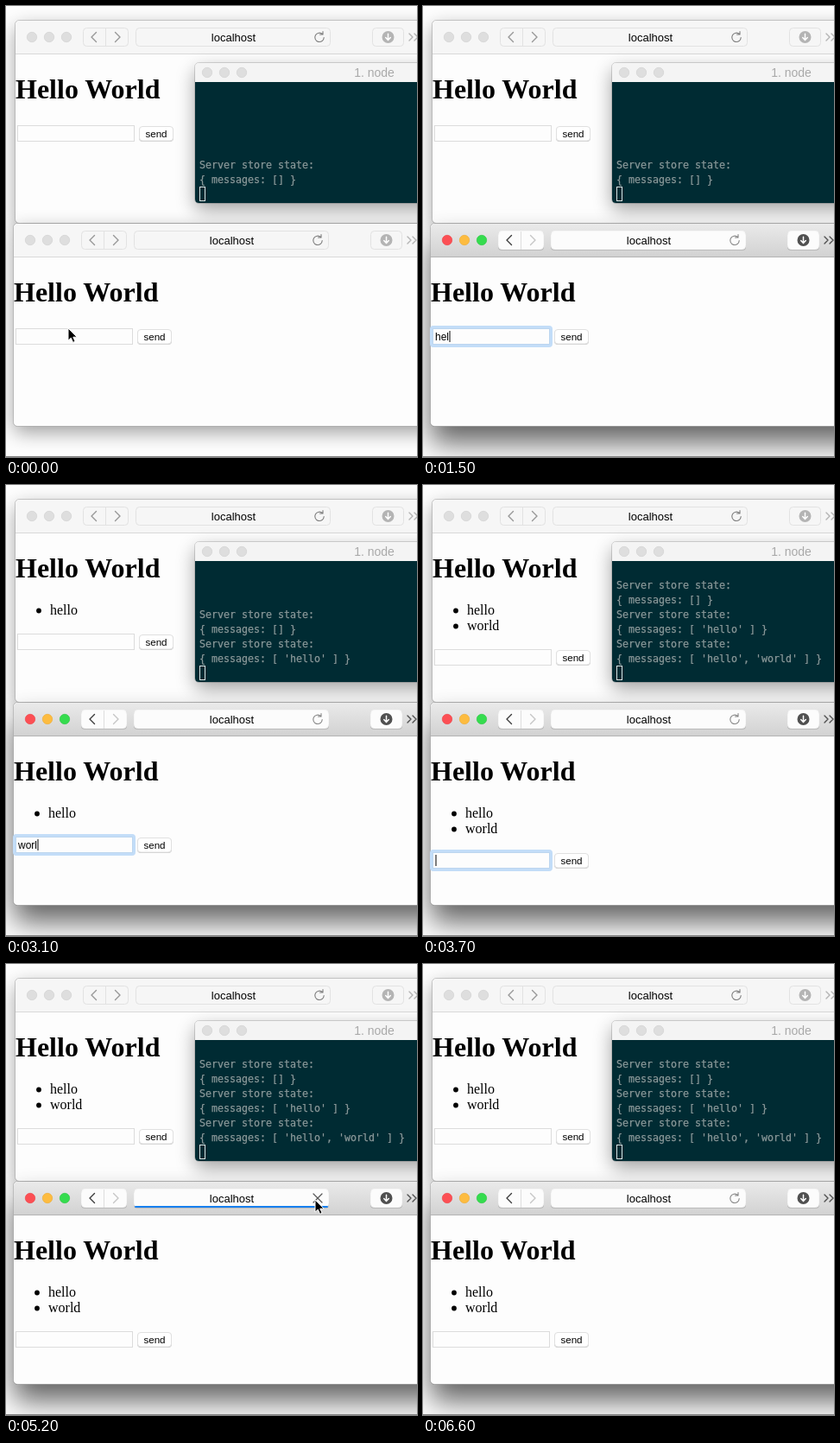
An HTML page for the animation above (6.7 s loop, 476 by 522 pixels).

```html
<!DOCTYPE html>
<html lang="en">
<head>
<meta charset="utf-8">
<title>Two browsers sharing a store</title>
<style>
  html, body { margin: 0; width: 100%; height: 100%; overflow: hidden; background: #fdfdfd; }
  svg { display: block; width: 476px; height: 522px; }
  text { font-family: "Liberation Sans", Arial, sans-serif; fill: #000; white-space: pre; }
  .serif { font-family: "Liberation Serif", Times, serif; font-size: 16px; }
  .h1 { font-size: 32px; font-weight: bold; }
  .mono { font-family: "DejaVu Sans Mono", monospace; font-size: 11.63px; fill: #8a9899; stroke: #8a9899; stroke-width: .25px; }
  .line { fill: none; stroke-linecap: round; stroke-linejoin: round; }
</style>
</head>
<body>
<svg viewBox="0 0 476 522" xmlns="http://www.w3.org/2000/svg">
  <defs>
    <linearGradient id="bar" x2="0" y2="1">
      <stop stop-color="#eaeaea"/><stop offset="1" stop-color="#d2d2d2"/>
    </linearGradient>
    <filter id="soft" x="-20%" y="-30%" width="140%" height="170%"><feGaussianBlur stdDeviation="11"/></filter>
    <filter id="deep" x="-20%" y="-40%" width="140%" height="190%"><feGaussianBlur stdDeviation="16"/></filter>
  </defs>
  <g id="scene"></g>
  <g id="arrow">
    <path d="M0 0V14.2L3.3 11.2L5.6 16.4L8.1 15.3L5.8 10.2H10.2Z" fill="#000" stroke="#fff" stroke-width="1"/>
  </g>
  <g id="beam" class="line">
    <path d="M-3.5 -8Q0 -8 0 -5.5Q0 -8 3.5 -8M0 -6V6M-3.5 8Q0 8 0 5.5Q0 8 3.5 8M-2 2.5H2" stroke="#111" stroke-width="1.3"/>
  </g>
</svg>
<script>
const LOOP = 6700;
const scene = document.getElementById('scene');
const arrow = document.getElementById('arrow');
const beam = document.getElementById('beam');

const words = [
  { text: 'hello', start: 1300, sent: 2200 },
  { text: 'world', start: 2800, sent: 3700 }
];
const KEY_TIME = 100;
const FOCUS_WINDOW = 300, FOCUS_INPUT = 700, HIDE_MOUSE = 1200, SHOW_MOUSE = 3900;
const LOAD_START = 5000, LOAD_DONE = 5500;

// Pointer keys: time, x, y
const path = [
  [0, 72, 373], [3900, 72, 373], [4400, 352, 280], [4800, 358, 273],
  [5600, 358, 273], [6200, 490, 330], [LOOP, 490, 330]
];

const rect = (x, y, w, h, r, attrs) =>
  `<rect x="${x}" y="${y}" width="${w}" height="${h}" rx="${r}" ${attrs}/>`;
const label = (x, y, str, attrs) => `<text x="${x}" y="${y}" ${attrs}>${str}</text>`;
const stroke = (d, color, width) =>
  `<path class="line" d="${d}" stroke="${color}" stroke-width="${width}"/>`;

function lights(x, y, focused) {
  const on = [['#fc4f54', '#ee474b'], ['#fdbc40', '#eeae38'], ['#35dc4e', '#2fcb46']];
  return on.map(([fill, edge], i) =>
    `<circle cx="${x + i * 20}" cy="${y}" r="5.7" fill="${focused ? fill : '#dedede'}" stroke="${focused ? edge : '#d2d2d2'}" stroke-width=".7"/>`
  ).join('');
}

function shadow(x, y, w, h, focused) {
  return focused
    ? rect(x, y + 20, w, h, 5, 'fill="#000" opacity=".6" filter="url(#deep)"')
    : rect(x, y + 8, w, h, 5, 'fill="#000" opacity=".36" filter="url(#soft)"');
}

function toolButton(x, w, focused) {
  return (focused ? rect(x, 26, w, 22, 4, 'fill="#bcbcbc"') : '') +
    rect(x + .5, 25.5, w - 1, 21, 4, focused
      ? 'fill="#fcfcfc" stroke="#f6f6f6"'
      : 'fill="#f6f6f6" stroke="#e2e2e2"');
}

function toolbar(focused, progress) {
  const back = focused ? '#3c3c3c' : '#979797';
  const forward = focused ? '#c6c6c6' : '#979797';
  const dark = focused ? '#505050' : '#b4b4b4';
  const reload = focused ? '#858585' : '#7c7c7c';
  const icon = progress > 0
    ? stroke('M358 31L368 41M368 31L358 41', '#555', 1.2)
    : stroke('M366.5 32.5A5.2 5.2 0 1 0 368.2 36.5M363.5 33H367V29.5', reload, 1.1);
  return `<path d="M11 55V22Q11 17 16 17H620V55Z" fill="${focused ? 'url(#bar)' : '#f6f6f6'}"/>` +
    rect(11, 55, 600, 1, 0, `fill="${focused ? '#b4b4b4' : '#d9d9d9'}"`) +
    lights(30, 36, focused) +
    toolButton(89, 53, focused) +
    rect(115, 26, 1, 21, 0, `fill="${focused ? '#dedede' : '#e2e2e2'}"`) +
    stroke('M104.5 30.5L99 36L104.5 41.5', back, 1.4) +
    stroke('M126.5 30.5L132 36L126.5 41.5', forward, 1.4) +
    toolButton(150, 226, focused) +
    (progress > 0 ? rect(151, 45, 224 * progress, 2, 1, 'fill="#1780ef"') : '') +
    label(263.5, 41, 'localhost', 'font-size="13" text-anchor="middle"') + icon +
    toolButton(424, 37, focused) +
    `<circle cx="442.5" cy="36" r="7" fill="${dark}"/>` +
    stroke('M442.5 32.3V39M439.7 36.6L442.5 39.5L445.3 36.6', '#fff', 1.5) +
    stroke('M467 32L471 36L467 40M473 32L477 36L473 40', dark, 1.4);
}

function page(items, form) {
  const dy = items.length ? 16 + 18 * items.length : 0;
  const list = items.map((item, i) =>
    `<circle cx="38" cy="${145.5 + 18 * i}" r="2.9"/>` +
    label(51, 150 + 18 * i, item, 'class="serif"')).join('');
  return label(11, 107, 'Hello World', 'class="serif h1"') + list +
    `<g transform="translate(0 ${dy})">` +
    (form.ring ? rect(12, 137, 138, 21, 2, 'fill="none" stroke="#c3ddf8" stroke-width="4"') : '') +
    rect(13.5, 138.5, 135, 18, 0, `fill="#fdfdfd" stroke="${form.ring ? '#bdd6ef' : '#dcdcdc'}"`) +
    label(16, 152, form.text, 'font-size="12"') +
    (form.caret ? rect(16.5 + form.width, 141, 1, 13, 0, 'fill="#000"') : '') +
    rect(154, 140, 40, 17, 4, 'fill="#cecece"') +
    rect(154.5, 139.5, 39, 16.5, 3.5, 'fill="#fff" stroke="#e0e0e0"') +
    label(174, 152, 'send', 'font-size="11.6" text-anchor="middle"') + '</g>';
}

function browser(x, y, focused, items, form, progress) {
  return `<g transform="translate(${x} ${y})">` + shadow(11, 16, 600, 235, focused) +
    rect(10.5, 16.5, 601, 235, 5, 'fill="#fdfdfd" stroke="#000" stroke-opacity=".2"') +
    toolbar(focused, progress) + page(items, form) + '</g>';
}

function terminal(items) {
  const lines = [];
  for (let n = 0; n <= items.length; n++) {
    const shown = items.slice(0, n).map(s => `'${s}'`).join(', ');
    lines.push('Server store state:', `{ messages: [${shown && ` ${shown} `}] }`);
  }
  const top = 205 - 17 * (lines.length - 1);
  return shadow(219, 66, 400, 162, false) +
    rect(218.5, 65.5, 401, 163, 5, 'fill="none" stroke="#000" stroke-opacity=".14"') +
    rect(219, 66, 400, 162, 4.5, 'fill="#f4f4f4"') +
    '<path d="M219 88H620V228H223.5Q219 228 219 223.5Z" fill="#002b33"/>' +
    lights(233, 77, false) +
    label(426.5, 82, '1. node', 'font-size="14" text-anchor="middle" style="fill:#a9a9a9"') +
    lines.map((line, i) => label(224, top + 17 * i, line, 'class="mono"')).join('') +
    rect(224.5, 209.5, 6, 16, 0, 'fill="none" stroke="#dfe4e4"');
}

const measure = document.createElement('canvas').getContext('2d');
measure.font = '12px "Liberation Sans", Arial, sans-serif';

function formAt(t) {
  const word = words.find(w => t >= w.start && t < w.sent);
  const text = word ? word.text.slice(0, Math.floor((t - word.start) / KEY_TIME) + 1) : '';
  const ring = t >= FOCUS_INPUT && t < LOAD_START + 100;
  const caret = ring && (!!word || Math.floor((t - FOCUS_INPUT) / 500) % 2 === 0);
  return { text, ring, caret, width: measure.measureText(text).width };
}

function pointerAt(t) {
  const i = path.findIndex(p => p[0] > t);
  const [t0, x0, y0] = path[i - 1], [t1, x1, y1] = path[i];
  const u = (t - t0) / (t1 - t0), e = u * u * (3 - 2 * u);
  return [x0 + (x1 - x0) * e, y0 + (y1 - y0) * e];
}

let lastMarkup = '';
function draw(t) {
  const items = words.filter(w => t >= w.sent).map(w => w.text);
  const idle = { text: '', ring: false, caret: false, width: 0 };
  const loading = t >= LOAD_START && t < LOAD_DONE;
  const progress = loading ? Math.min(1, .2 + (t - LOAD_START) / 250) : 0;
  const markup = rect(0, 0, 476, 522, 0, 'fill="#fdfdfd"') +
    browser(0, 0, false, items, idle, 0) + terminal(items) +
    browser(-2, 235, t >= FOCUS_WINDOW, items, formAt(t), progress) +
    rect(0, 521, 476, 1, 0, 'fill="#858585"');
  if (markup !== lastMarkup) scene.innerHTML = lastMarkup = markup;

  const [x, y] = pointerAt(t);
  const overInput = t >= FOCUS_WINDOW && t < HIDE_MOUSE;
  const place = `translate(${x.toFixed(1)} ${y.toFixed(1)})`;
  arrow.setAttribute('transform', place);
  beam.setAttribute('transform', place);
  beam.style.display = overInput ? '' : 'none';
  arrow.style.display = t < FOCUS_WINDOW || t >= SHOW_MOUSE ? '' : 'none';
}

const began = performance.now();
function tick() {
  draw((performance.now() - began) % LOOP);
  requestAnimationFrame(tick);
}
tick();
</script>
</body>
</html>
```
